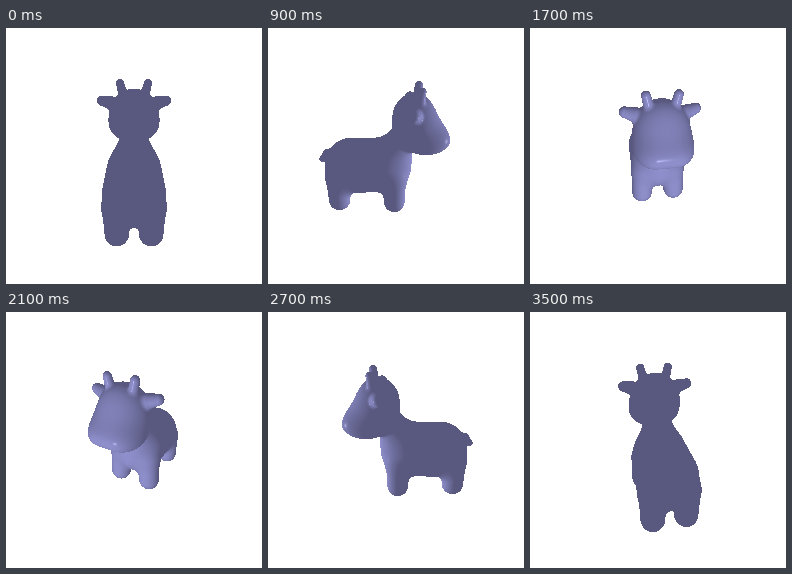
An HTML page with a canvas that plays this animation: 256x256 px, repeating every 3600 ms.

```html
<!DOCTYPE html>
<html lang="en">
<head>
<meta charset="utf-8">
<title>Turning calf</title>
<style>
  html, body { margin: 0; width: 100%; height: 100%; overflow: hidden; background: #fff; }
  canvas { display: block; width: 100vmin; height: 100vmin; }
</style>
</head>
<body>
<canvas width="256" height="256"></canvas>
<script>
const SIZE = 256, STEPS = 36, STEP_MS = 100;
const DIST = 3, ELEV = Math.PI / 6, FOCAL = SIZE / 2 / Math.tan(Math.PI / 6);
const BASE = [178.5, 178.5, 255], LIGHT_Z = -3;
const ctx = document.querySelector('canvas').getContext('2d');
const { sqrt, sin, cos, max, min, abs } = Math;

// Tapered capsule from a to b; the model is mirrored in x.
function capsule(ax, ay, az, ra, bx, by, bz, rb) {
  const dx = bx - ax, dy = by - ay, dz = bz - az;
  const inv = 1 / (dx * dx + dy * dy + dz * dz);
  return (x, y, z) => {
    x -= ax; y -= ay; z -= az;
    const h = max(0, min(1, (x * dx + y * dy + z * dz) * inv));
    x -= h * dx; y -= h * dy; z -= h * dz;
    return sqrt(x * x + y * y + z * z) - ra - (rb - ra) * h;
  };
}

// Ellipsoid on the mirror plane, widened by a straight part in x.
function ellipsoid(wide, cy, cz, rx, ry, rz) {
  return (x, y, z) => {
    x = max(x - wide, 0) / rx; y = (y - cy) / ry; z = (z - cz) / rz;
    const k = sqrt(x * x + y * y + z * z);
    const g = sqrt((x / rx) ** 2 + (y / ry) ** 2 + (z / rz) ** 2);
    return g < 1e-6 ? -min(rx, ry, rz) : k * (k - 1) / g;
  };
}

function blend(a, b, k) {
  const h = max(k - abs(a - b), 0);
  return min(a, b) - h * h / (4 * k);
}

const trunk = capsule(0, 0, .15, .357, 0, 0, .605, .36);
const neck = capsule(0, .45, -.2, .18, 0, 0, .08, .18);
const foreLeg = capsule(.22, -.25, .02, .145, .235, -.595, .025, .145);
const hindLeg = capsule(.2, -.25, .77, .15, .2, -.592, .79, .145);
const tail = capsule(0, .06, .93, .04, 0, -.05, 1.01, .035);
const head = ellipsoid(0, .53, -.22, .31, .305, .265);
const muzzle = ellipsoid(.11, .295, -.41, .21, .158, .255);
const horn = capsule(.13, .7, -.265, .062, .175, .895, -.28, .05);
const ear = capsule(.3, .67, -.2, .083, .405, .7, -.185, .062);

function distance(x, y, z) {
  x = abs(x);
  // The trunk is slightly taller than wide.
  let torso = trunk(x, max(abs(y + .145) - .02, 0), z);
  torso = blend(torso, foreLeg(x, y, z), .1);
  torso = blend(torso, hindLeg(x, y, z), .1);
  torso = blend(torso, tail(x, y, z), .05);
  let face = blend(head(x, y, z), muzzle(x, y, z), .3);
  face = blend(face, ear(x, y, z), .05);
  face = blend(face, horn(x, y, z), .03);
  return blend(blend(torso, neck(x, y, z), .18), face, .06);
}

function normal(x, y, z) {
  const e = .002;
  const a = distance(x + e, y - e, z - e), b = distance(x - e, y - e, z + e);
  const c = distance(x - e, y + e, z - e), d = distance(x + e, y + e, z + e);
  return unit(a - b - c + d, c + d - a - b, b + d - a - c);
}

function unit(x, y, z) {
  const l = sqrt(x * x + y * y + z * z) || 1;
  return [x / l, y / l, z / l];
}

const dot = (a, b) => a[0] * b[0] + a[1] * b[1] + a[2] * b[2];

// Ambient, diffuse and highlight from a lamp in front of the face.
function shade(x, y, z, ray) {
  const n = normal(x, y, z), l = unit(-x, -y, LIGHT_Z - z);
  const nl = dot(n, l);
  if (nl <= 0) return [.5, 0];
  const gloss = max(0, dot(l, ray) - 2 * nl * dot(n, ray));
  return [.5 + .3 * nl, 51 * gloss ** 64];
}

function render(angle) {
  const image = ctx.createImageData(SIZE, SIZE), px = image.data.fill(255);
  const sa = sin(angle), ca = cos(angle), se = sin(ELEV), ce = cos(ELEV);
  const ox = DIST * ce * sa, oy = DIST * se, oz = DIST * ce * ca;
  for (let j = 44; j < 226; j++) for (let i = 44; i < 214; i++) {
    const u = (i + .5 - SIZE / 2) / FOCAL, v = (SIZE / 2 - j - .5) / FOCAL;
    const ray = unit(
      u * ca - v * se * sa - ce * sa,
      v * ce - se,
      -u * sa - v * se * ca - ce * ca);
    const [rx, ry, rz] = ray;
    for (let t = 1.6, n = 0; t < 4.4 && n < 200; n++) {
      const x = ox + rx * t, y = oy + ry * t, z = oz + rz * t;
      const d = distance(x, y, z);
      if (d < .001) {
        const [k, gloss] = shade(x, y, z, ray);
        BASE.forEach((c, m) => px[(j * SIZE + i) * 4 + m] = c * k + gloss);
        break;
      }
      t += max(d * .9, .0008);
    }
  }
  return image;
}

const views = [];
let shown = -1;

function draw() {
  const step = Math.floor(performance.now() / STEP_MS) % STEPS;
  if (step !== shown) {
    views[step] ||= render(step * 2 * Math.PI / STEPS);
    ctx.putImageData(views[step], 0, 0);
    shown = step;
  }
  requestAnimationFrame(draw);
}
draw();
</script>
</body>
</html>
```
